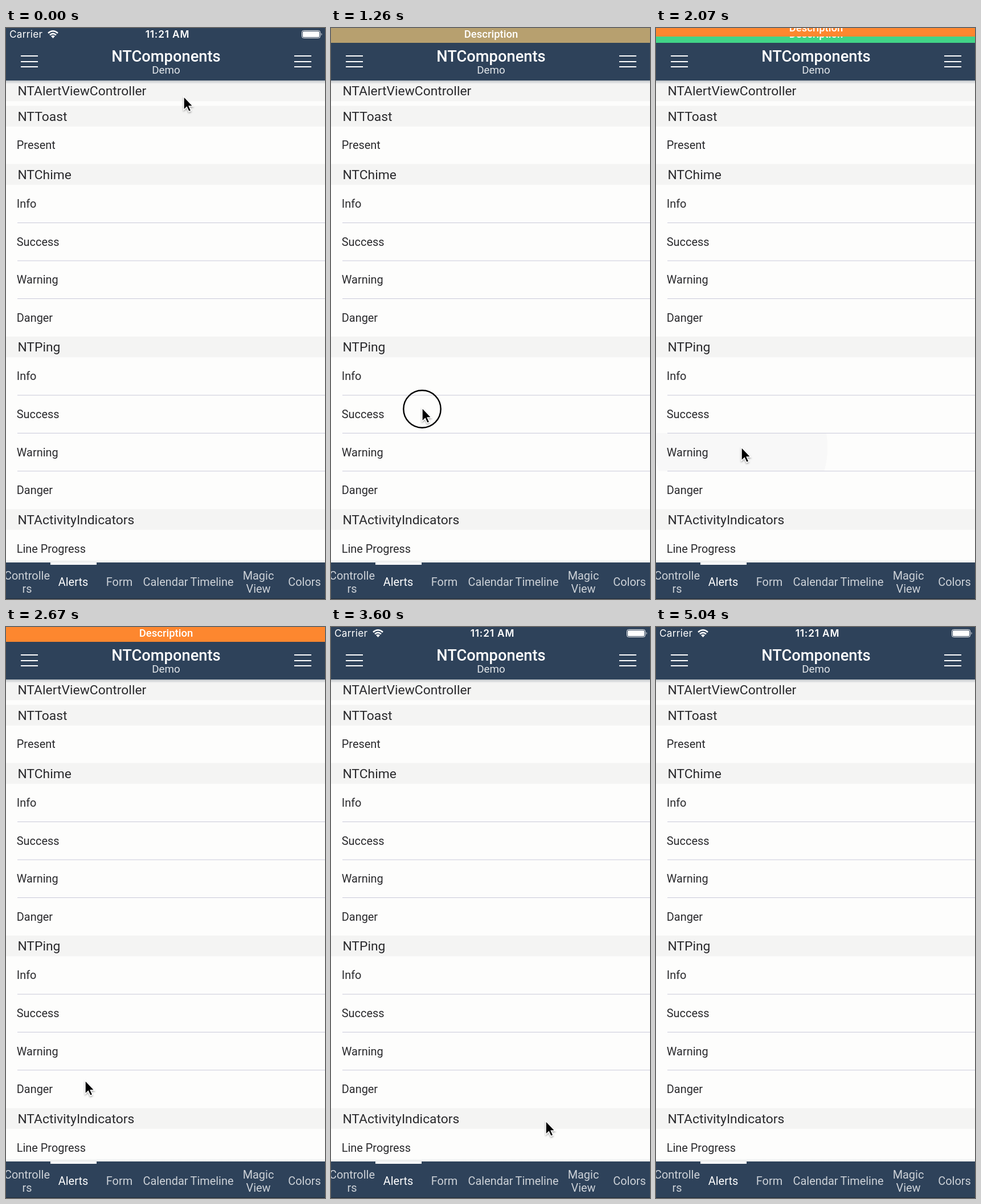
Animation of 560x1001 px, one loop 5.07 s. Source, as an HTML page:

```html
<!DOCTYPE html>
<html lang="en">
<head>
<meta charset="utf-8">
<title>Alerts demo</title>
<style>
  html, body { margin: 0; height: 100%; overflow: hidden; background: #fdfdfc; }
  svg { display: block; width: 100vw; height: 100vh; font-family: Roboto, sans-serif; }
  .section { font-size: 22.85px; fill: #29292c; }
  .row { font-size: 19.9px; fill: #29292c; }
  .tab { font-size: 19.9px; fill: #cdd2d8; text-anchor: middle; }
  .tab.active { fill: #fff; }
  .mid { text-anchor: middle; }
  .status { font: 17.3px Inter, sans-serif; fill: #fff; letter-spacing: .25px; }
  .status.time { font-weight: 600; letter-spacing: .8px; }

  .banner, .ripple, .press, #cursor { animation: 5070ms linear infinite; }

  /* --s is the moment a banner starts to drop in */
  .banner { transform: translateY(-26px); animation-name: banner; animation-delay: var(--s); }
  @keyframes banner {
    0% { transform: translateY(-26px); animation-timing-function: ease-out; }
    2.96%, 16.17% { transform: none; animation-timing-function: ease-in; }
    17.36%, 100% { transform: translateY(-26px); }
  }
  .ripple {
    transform: scale(0); transform-box: fill-box; transform-origin: center;
    animation-name: ripple; animation-delay: calc(var(--s) - 20ms);
  }
  @keyframes ripple {
    0% { transform: scale(0); opacity: 1; }
    5.92% { transform: scale(1); opacity: 1; }
    9.47%, 100% { transform: scale(1); opacity: 0; }
  }
  .press { opacity: 0; animation-name: press; animation-delay: calc(var(--s) - 35ms); }
  @keyframes press {
    0%, 1.78% { opacity: 1; }
    1.79%, 100% { opacity: 0; }
  }
  #cursor { animation-name: cursor; animation-timing-function: ease-in-out; }
  @keyframes cursor {
    0% { transform: translate(312px, 120px); }
    7.5%, 12.2% { transform: translate(183px, 617px); }
    22.5%, 26.4% { transform: translate(160px, 666px); }
    35.5% { transform: translate(151px, 717px); }
    38.7%, 41% { transform: translate(150px, 735px); }
    49.3%, 55.2% { transform: translate(139px, 795px); }
    71% { transform: translate(377px, 866px); animation-timing-function: ease-in; }
    74.6%, 100% { transform: translate(580px, 900px); }
  }
</style>
</head>
<body>
<svg id="stage" viewBox="0 0 560 1001" preserveAspectRatio="none"></svg>
<script>
const NAVY = '#2e425a';
const pings = [
  { start: 450, color: '#b7a06f', x: 183, y: 617, top: 577.5 },
  { start: 1290, color: '#41d487', x: 160, y: 668, top: 644 },
  { start: 2010, color: '#fd872f', x: 150, y: 735, top: 710.5 },
  { start: 2710, color: '#ef4a40', x: 139, y: 795, top: 777 }
];

const rect = (x, y, w, h, fill, extra = '') =>
  `<rect x="${x}" y="${y}" width="${w}" height="${h}" fill="${fill}" ${extra}/>`;
const text = (x, y, label, cls, extra = '') =>
  `<text x="${x}" y="${y}" class="${cls}" ${extra}>${label}</text>`;
const section = (top, label) =>
  rect(0, top, 560, 36.3, '#f4f4f3') + text(20.4, top + 26, label, 'section');
const row = (middle, label) => text(18.8, middle + 7, label, 'row');
const line = y => rect(20, y - 0.5, 540, 1, '#c9c9d9');
const menu = x => [49, 59, 68].map(y => rect(x, y - 1, 30, 2, '#fff')).join('');
const tab = (x, y, label, cls = '') => text(x, y, label, 'tab ' + cls);

const levels = ['Info', 'Success', 'Warning', 'Danger'];
const levelRows = top => levels.map((label, i) =>
  row(top + 33 + i * 66.6, label) + (i ? line(top + i * 66.5) : '')).join('');

const ripples = pings.map((p, i) => `
  <clipPath id="row${i}">${rect(0, p.top, 560, 66, '#000')}</clipPath>
  <g clip-path="url(#row${i})">
    <circle class="ripple" style="--s:${p.start}ms" cx="${p.x}" cy="${p.y}" r="560" fill="#f8f8f8"/>
  </g>`).join('');

const list = ripples +
  section(92, 'NTAlertViewController') +
  section(136.5, 'NTToast') + row(205, 'Present') +
  section(238.5, 'NTChime') + levelRows(275) +
  section(541, 'NTPing') + levelRows(577.3) +
  section(843.5, 'NTActivityIndicators') + row(913, 'Line Progress');

const navBar = `
  ${rect(0, 92, 560, 6, 'url(#shade)')}
  ${rect(0, 0, 560, 92, NAVY)}
  ${text(6, 17, 'Carrier', 'status')}
  <g fill="none" stroke="#fff" stroke-width="2.5">
    <path d="M74 9Q82.500 1.500 91 9M77 12.200Q82.500 7.500 88 12.200"/>
  </g>
  <path d="M79 14.300Q82.500 11.500 86 14.300L82.500 18Z" fill="#fff"/>
  ${text(283.4, 17, '11:21 AM', 'status time mid')}
  ${rect(519.5, 4.5, 32, 13, 'none', 'rx="3" stroke="#fff"')}
  ${rect(521, 6, 29, 10, '#fff', 'rx="1.5"')}
  <path d="M553.500 8.500q2 2.500 0 5z" fill="#fff"/>
  ${menu(26)}${menu(506)}
  ${text(281, 58.5, 'NTComponents', 'mid', 'font-size="27.3" font-weight="500" fill="#fff"')}
  ${text(281, 80.3, 'Demo', 'mid', 'font-size="18.8" fill="#e2e6ea"')}`;

const tabBar = `
  ${rect(0, 932, 560, 5, 'url(#shadeUp)')}
  ${rect(0, 937, 560, 64, NAVY)}
  ${rect(0, 1000, 560, 1, '#1d2a39')}
  ${rect(78, 937, 81, 4, '#fff')}
  ${tab(37, 967, 'Controlle')}${tab(37, 990, 'rs')}
  ${tab(118, 978, 'Alerts', 'active')}
  ${tab(199, 978, 'Form')}
  ${tab(280, 978, 'Calendar')}
  ${tab(361.5, 978, 'Timeline')}
  ${tab(443, 967, 'Magic')}${tab(443, 990, 'View')}
  ${tab(524, 978, 'Colors')}`;

const banners = pings.map(p => `
  <g class="banner" style="--s:${p.start}ms">
    ${rect(0, 0, 560, 26, p.color)}
    ${text(281, 17, 'Description', 'mid', 'font-size="18.5" font-weight="500" fill="#fff"')}
  </g>`).join('');

const presses = pings.map(p =>
  `<circle class="press" style="--s:${p.start}ms" cy="2" r="32.7" fill="none" stroke="#000" stroke-width="2.4"/>`).join('');

const cursor = `
  <g id="cursor">
    ${presses}
    <path d="M0 0V23.500L5.300 18.500 9 26.500 12.800 24.800 9.200 17H16.200Z"
      stroke="#fff" stroke-width="1.4" filter="url(#drop)"/>
  </g>`;

const gradient = (id, from, to) => `
  <linearGradient id="${id}" x2="0" y2="1">
    <stop stop-color="#405060" stop-opacity="${from}"/>
    <stop offset="1" stop-color="#405060" stop-opacity="${to}"/>
  </linearGradient>`;

document.getElementById('stage').innerHTML = `
  <defs>
    ${gradient('shade', 0.3, 0)}${gradient('shadeUp', 0, 0.12)}
    <filter id="drop" x="-50%" y="-50%" width="200%" height="200%">
      <feDropShadow dx="0" dy="2" stdDeviation="1.5" flood-opacity=".35"/>
    </filter>
  </defs>
  ${rect(0, 0, 560, 1001, '#fdfdfc')}
  ${list}${navBar}${tabBar}${banners}${cursor}`;
</script>
</body>
</html>
```
